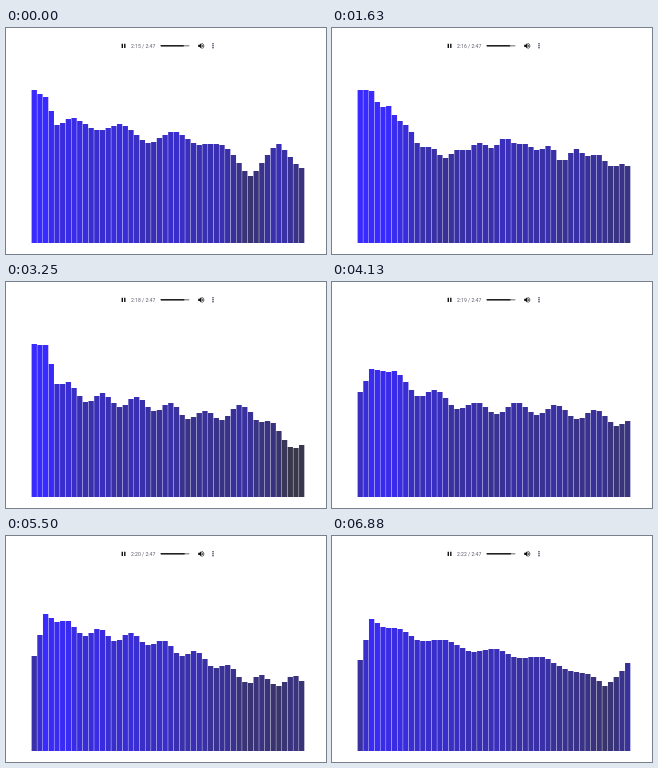
An HTML page that plays this animation: 320 by 226 pixels, repeating every 7010 ms.

```html
<!DOCTYPE html>
<html lang="en">
<head>
<meta charset="utf-8">
<title>Audio bars</title>
<style>
  html, body { margin: 0; width: 100%; height: 100%; overflow: hidden; background: #fff; }
  svg { display: block; width: 100%; height: 100%; }
  text { font: 5.1px Roboto, sans-serif; fill: #5c5c6c; }
</style>
</head>
<body>
<svg viewBox="0 0 320 226">
  <g id="bars"></g>
  <g id="controls" fill="#111">
    <path d="M115.6 15.7h1.4v4.3h-1.4zM118.1 15.7h1.4v4.3h-1.4z"/>
    <text id="clock" x="125" y="19.6"></text>
    <rect x="154.5" y="17.1" width="29" height="1.4" rx=".7" fill="#999"/>
    <rect id="progress" x="154.5" y="17.1" height="1.4" rx=".7" fill="#222"/>
    <path d="M192.2 16.7h1.4l1.8-1.7v5.8l-1.8-1.7h-1.4z"/>
    <path d="M196 16.5q1.3 1.4 0 2.8M196.3 15.2q3.2 2.7 0 5.4" fill="none" stroke="#111" stroke-width=".7"/>
    <path d="M207 15.8v0M207 17.8v0M207 19.8v0" stroke="#224" stroke-width="1.5" stroke-linecap="round"/>
  </g>
</svg>
<script>
const LOOP = 7010, STEP = 125, LAST = 55;
const COUNT = 48, LEFT = 25.6, PITCH = 5.69, WIDTH = 5.3, FLOOR = 215, CEILING = 62;
const START_SECOND = 135, DURATION = 167;

// Each pose is a falling midline through a few key bars, plus a regular
// ripple given by its height, the bar of its first crest and its period.
const keyBars = [0, 2, 4, 10, 20, 30, 38, 43, 47];
const poses = [
  { at: 0, midline: [62, 69, 97, 95, 109, 111, 142, 122, 134], ripple: [6, 6.5, 9] },
  { at: 9, midline: [62, 62, 89, 126, 121, 131, 124, 132, 140], ripple: [5, 12.7, 4.2] },
  { at: 18, midline: [62, 63, 79, 102, 114, 119, 125, 125, 129], ripple: [4, 12, 7.2] },
  { at: 26, midline: [62, 63, 101, 116, 122, 135, 127, 152, 166], ripple: [6, 6, 6] },
  { at: 33, midline: [110, 87, 88, 108, 126, 126, 131, 135, 140], ripple: [6, 6.5, 7] },
  { at: 44, midline: [120, 78, 86, 97, 104, 123, 144, 145, 145], ripple: [5, 5.7, 5.7] },
  { at: 55, midline: [124, 83, 91, 101, 113, 121, 134, 150, 126], ripple: [3, 6.5, 8.6] }
];

const byId = id => document.getElementById(id);
const clamp = (v, lo, hi) => Math.min(hi, Math.max(lo, v));
const mix = (a, b, t) => a + (b - a) * t;

function poseTop({ midline, ripple: [height, crest, period] }, bar) {
  const k = Math.max(1, keyBars.findIndex(x => x >= bar));
  const t = (bar - keyBars[k - 1]) / (keyBars[k] - keyBars[k - 1]);
  const fadeIn = clamp((bar - 3) / 3, 0, 1);
  const wave = Math.cos(2 * Math.PI * (bar - crest) / period);
  return mix(midline[k - 1], midline[k], t) - height * fadeIn * wave;
}

function random(a, b) {
  const s = Math.sin(a * 127.1 + b * 311.7) * 43758.5453;
  return s - Math.floor(s);
}

// Smooth across neighbouring bars, fresh for every step; range -1 to 1.
function wobble(bar, step) {
  const cell = Math.floor(bar / 2.5), t = bar / 2.5 - cell;
  return mix(random(cell, step), random(cell + 1, step), t) * 2 - 1;
}

function barTop(bar, step) {
  const next = Math.max(1, poses.findIndex(p => p.at >= step));
  const from = poses[next - 1], to = poses[next];
  const t = (step - from.at) / (to.at - from.at);
  const base = mix(poseTop(from, bar), poseTop(to, bar), t);
  const sway = 10 * Math.sin(Math.PI * t) * clamp((base - CEILING) / 20, 0, 1);
  return Math.max(CEILING, base + sway * wobble(bar, step));
}

function barColor(height) {
  const blue = clamp(2.1 * height - 30, 66, 255);
  return `rgb(57 ${Math.round(60 - blue / 14)} ${Math.round(blue)})`;
}

const bars = Array.from({ length: COUNT }, (_, i) => {
  const rect = document.createElementNS("http://www.w3.org/2000/svg", "rect");
  rect.setAttribute("x", LEFT + i * PITCH);
  rect.setAttribute("width", WIDTH);
  return byId("bars").appendChild(rect);
});

const clockText = s => `${Math.floor(s / 60)}:${String(s % 60).padStart(2, "0")}`;

function draw(step) {
  bars.forEach((rect, i) => {
    const top = Math.round(barTop(i, step));
    rect.setAttribute("y", top);
    rect.setAttribute("height", FLOOR - top);
    rect.setAttribute("fill", barColor(FLOOR - top));
  });
  const second = START_SECOND + Math.floor((step + 1) * STEP / 1000);
  byId("clock").textContent = `${clockText(second)} / ${clockText(DURATION)}`;
  byId("progress").setAttribute("width", 29 * (START_SECOND + step * STEP / 1000) / DURATION);
}

const start = performance.now();
let shown = -1;

function tick() {
  const time = (performance.now() - start) % LOOP;
  // Steps land on whole hundredths of a second.
  const step = Math.min(LAST, Math.floor(Math.floor(time / 10) * 10 / STEP));
  if (step !== shown) draw(shown = step);
  requestAnimationFrame(tick);
}
tick();
</script>
</body>
</html>
```
